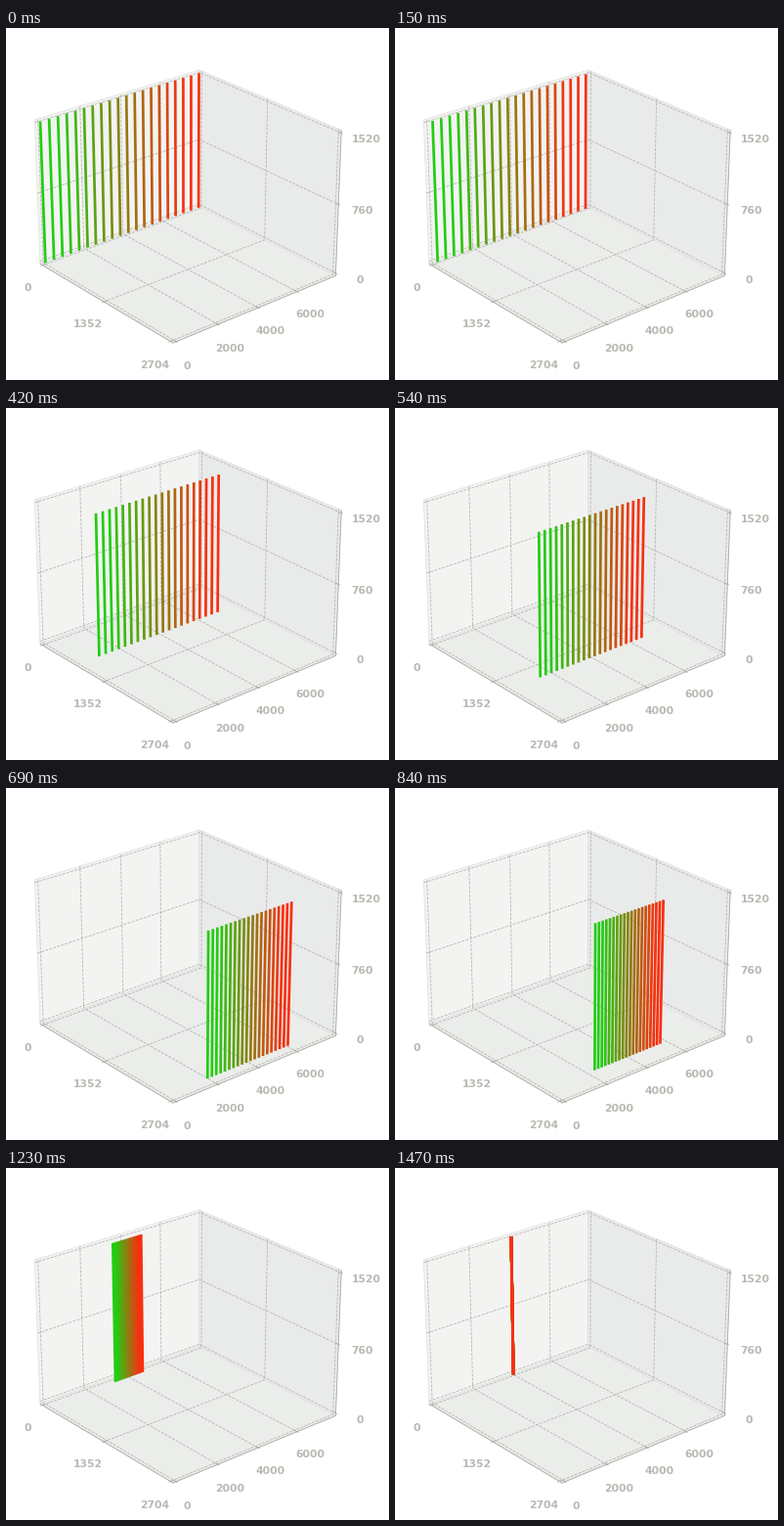
Recreate the animation shown at these times as a matplotlib script. Size 392x360 px, loop 1.5 s.

```python
import numpy as np
import matplotlib.pyplot as plt
from matplotlib.animation import FuncAnimation
from matplotlib.collections import LineCollection

W, H, DPI = 392, 360, 72
FRAMES, INTERVAL = 50, 30
BARS = 20
SPAN = np.array([2704, 7900, 1520])
MARGIN = 0.019
LO, HI = -MARGIN, 1 + MARGIN

# Camera
ELEV, AZIM = np.radians(25), np.radians(-40)
DIST, ZOOM = 10, 1851
CENTRE = np.array([185.2, 174.6])
BOX = np.array([1.138, 1.138, 0.85])

GRID, EDGE, TEXT = "#b3b3b0", "#adb0a6", "#b9b9b3"
GREEN = np.array([34, 205, 18]) / 255
RED = np.array([248, 48, 16]) / 255


def project(points):
    """Map box fractions (n, 3) to stage pixels (n, 2)."""
    p = (np.asarray(points, float) - 0.5) * BOX
    se, ce, sa, ca = np.sin(ELEV), np.cos(ELEV), np.sin(AZIM), np.cos(AZIM)
    right = p @ [-sa, ca, 0]
    up = p @ [-se * ca, -se * sa, ce]
    depth = DIST - p @ [ce * ca, ce * sa, se]
    return CENTRE + ZOOM * np.column_stack([right, -up]) / depth[:, None]


def path(points, **style):
    ax.plot(*project(points).T, **style)


def pane(points, color):
    ax.fill(*project(points).T, facecolor=color, edgecolor="#dededc", lw=0.7)


def glide(t, times, values):
    """Smooth curve through a few keys, starting at rest."""
    times, values = np.array(times, float), np.array(values, float)
    slopes = np.gradient(values, times)
    slopes[0] = 0
    i = min(np.searchsorted(times, t, side="right") - 1, len(times) - 2)
    step = times[i + 1] - times[i]
    u = (t - times[i]) / step
    return ((1 + 2 * u) * (1 - u) ** 2 * values[i]
            + u * (1 - u) ** 2 * step * slopes[i]
            + u * u * (3 - 2 * u) * values[i + 1]
            + u * u * (u - 1) * step * slopes[i + 1])


fig = plt.figure(figsize=(W / DPI, H / DPI), dpi=DPI, facecolor="white")
ax = fig.add_axes([0, 0, 1, 1])
ax.set(xlim=(0, W), ylim=(H, 0))
ax.axis("off")

# Walls and floor
pane([(LO, LO, LO), (LO, HI, LO), (LO, HI, HI), (LO, LO, HI)], "#f3f3f2")
pane([(LO, HI, LO), (HI, HI, LO), (HI, HI, HI), (LO, HI, HI)], "#e9ebea")
pane([(LO, LO, LO), (HI, LO, LO), (HI, HI, LO), (LO, HI, LO)], "#ebedeb")

# Grid lines, each with a tick at its labelled edge
grid = dict(color=GRID, lw=0.8, ls="--")
edge = dict(color=EDGE, lw=0.9)
INNER, OUTER = 1 / 60, 1 / 120
for x in np.array([0, 1352, 2704]) / SPAN[0]:
    path([(x, LO, LO), (x, HI, LO), (x, HI, HI)], **grid)
    path([(x, LO - OUTER, LO), (x, LO + INNER, LO)], **edge)
for y in np.array([0, 2000, 4000, 6000]) / SPAN[1]:
    path([(HI, y, LO), (LO, y, LO), (LO, y, HI)], **grid)
    path([(HI + OUTER, y, LO), (HI - INNER, y, LO)], **edge)
for z in np.array([0, 760, 1520]) / SPAN[2]:
    path([(LO, LO, z), (LO, HI, z), (HI, HI, z)], **grid)
    path([(HI + OUTER, HI, z), (HI - INNER, HI, z)], **edge)
path([(LO, LO, LO), (HI, LO, LO), (HI, HI, LO), (HI, HI, HI)], **edge)

LABELS = [
    (22, 265, "0"), (84, 302, "1352"), (152, 344, "2704"),
    (185, 345, "0"), (229, 327, "2000"), (271, 309, "4000"), (311, 292, "6000"),
    (362, 257, "0"), (365, 186, "760"), (369, 113, "1520"),
]
for x, y, label in LABELS:
    ax.text(x, y + 3.8, label, ha="center", va="baseline", color=TEXT,
            family="DejaVu Sans", weight="bold", size=10.7)

# Row of upright bars
rank = np.linspace(0, 1, BARS)
mix = np.clip(0.5 + 1.25 * (rank - 0.5), 0, 1)[:, None]
bars = LineCollection([], colors=GREEN + (RED - GREEN) * mix,
                      linewidths=2.7, capstyle="projecting", zorder=5)
ax.add_collection(bars, autolim=False)


def draw(i):
    x = np.full(BARS, 0.985 * np.sin(np.pi * i / 49.5) ** 4.85)
    spread = glide(i, [0, 9, 14, 23, 33, 41, 49],
                   [1, 0.897, 0.768, 0.513, 0.337, 0.178, 0])
    y = 0.5 + (rank - 0.5) * spread
    foot = project(np.column_stack([x, y, np.zeros(BARS)]))
    head = project(np.column_stack([x, y, np.ones(BARS)]))
    bars.set_segments(np.stack([foot, head], axis=1))
    return [bars]


anim = FuncAnimation(fig, draw, frames=FRAMES, interval=INTERVAL, repeat=True)
plt.show()
```
